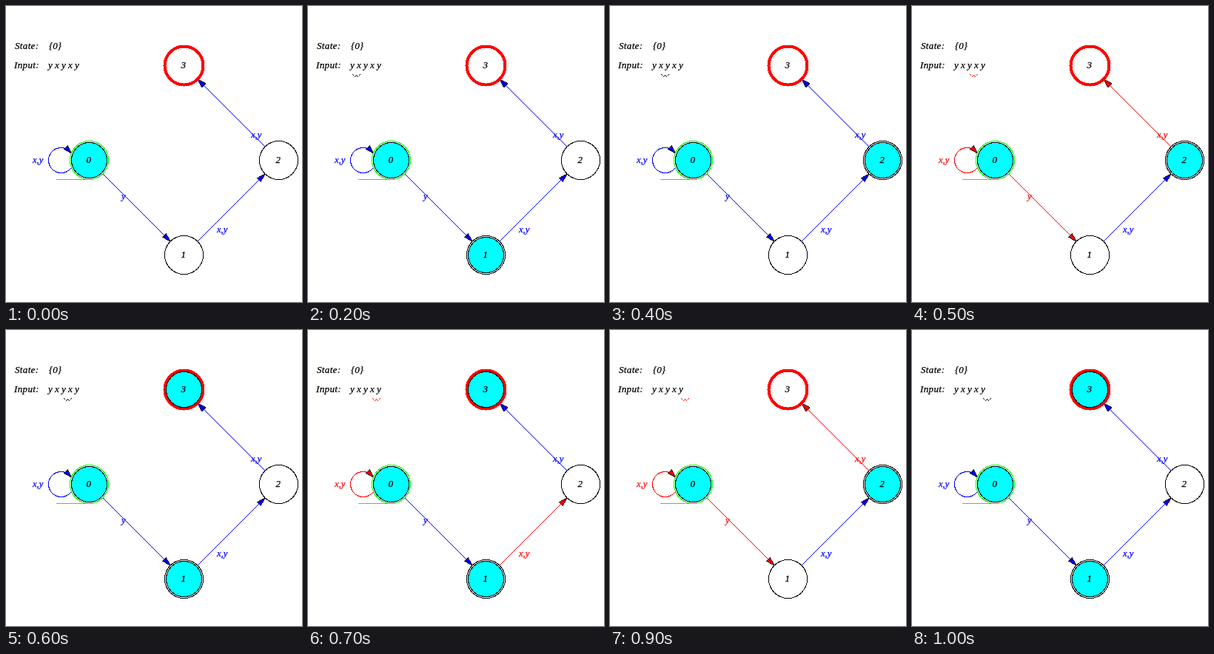
These frames come from a looping animation (400 by 400 pixels, 1.1 s). An HTML page:

```html
<!DOCTYPE html>
<html lang="en">
<head>
<meta charset="utf-8">
<title>Automaton run</title>
<style>
  html, body { margin: 0; width: 100%; height: 100%; overflow: hidden; background: #fff; }
  svg { display: block; width: 400px; height: 400px; }
  text {
    font: italic 13px "Liberation Serif", "Times New Roman", serif;
    fill: currentColor; stroke: currentColor; stroke-width: .25;
  }
  .head { letter-spacing: .35px; }
  .line { fill: none; stroke: #000; shape-rendering: crispEdges; }
  .start { stroke: #0f0; }
  .final { stroke: #f00; stroke-width: 4; }
  .active { fill: #0ff; stroke: #000; shape-rendering: crispEdges; }

  .edge { color: #00f; }
  .edge .line, .caret .line { stroke: currentColor; }
  .edge text { font-size: 12.5px; }
  .tip { fill: currentColor; stroke: #000; stroke-width: .9; shape-rendering: crispEdges; }

  /* Eleven steps of 100 ms: odd steps read a symbol, even steps settle. */
  .edge, .run, .caret { animation: 1100ms step-end infinite; }
  .loop { animation-name: any; }
  .e01 { animation-name: first; }
  .e12 { animation-name: second; }
  .e23 { animation-name: third; }
  .s1 { animation-name: on1; }
  .s2 { animation-name: on2; }
  .s3 { animation-name: on3; }
  .caret { animation-name: move, read; }

  @keyframes any {
    0%, 18.18%, 36.36%, 54.54%, 72.72%, 90.9% { color: #00f; }
    9.09%, 27.27%, 45.45%, 63.63%, 81.81% { color: #f00; }
  }
  @keyframes read {
    0%, 18.18%, 36.36%, 54.54%, 72.72%, 90.9% { color: #000; }
    9.09%, 27.27%, 45.45%, 63.63%, 81.81% { color: #f00; }
  }
  @keyframes first {
    0%, 18.18%, 54.54%, 90.9% { color: #00f; }
    9.09%, 45.45%, 81.81% { color: #f00; }
  }
  @keyframes second {
    0%, 36.36%, 72.72% { color: #00f; }
    27.27%, 63.63% { color: #f00; }
  }
  @keyframes third {
    0%, 54.54%, 90.9% { color: #00f; }
    45.45%, 81.81% { color: #f00; }
  }
  @keyframes on1 {
    0%, 36.36%, 72.72% { visibility: hidden; }
    18.18%, 54.54%, 90.9% { visibility: visible; }
  }
  @keyframes on2 {
    0%, 54.54%, 90.9% { visibility: hidden; }
    36.36%, 72.72% { visibility: visible; }
  }
  @keyframes on3 {
    0%, 72.72% { visibility: hidden; }
    54.54%, 90.9% { visibility: visible; }
  }
  @keyframes move {
    0% { visibility: hidden; transform: translate(65px, 92px); }
    9.09% { visibility: visible; transform: translate(65px, 92px); }
    27.27% { visibility: visible; transform: translate(74px, 92px); }
    45.45% { visibility: visible; transform: translate(83px, 92px); }
    63.63% { visibility: visible; transform: translate(92px, 92px); }
    81.81%, 100% { visibility: visible; transform: translate(101px, 92px); }
  }
</style>
</head>
<body>
<svg viewBox="0 0 400 400">
  <defs>
    <path id="tip" d="M0 0L-11.5 -3.5V3.5Z"/>
    <circle id="ring" r="26"/>
    <circle id="disc" r="24"/>
  </defs>

  <text class="head" x="12" y="58">State:</text>
  <text x="58" y="58">{0}</text>
  <text class="head" x="11" y="84">Input:</text>
  <text x="57" y="84">y x y x y</text>
  <g class="caret"><path class="line" d="M-4.5 .5l2 2M-2.5 4.5L.5 1.5L3.5 4.5M3.5 2.5l2 -2"/></g>

  <g class="edge loop">
    <circle class="line" cx="74.5" cy="208.5" r="17"/>
    <use href="#tip" class="tip" transform="translate(89 199.5) rotate(46)"/>
    <text x="36" y="212">x,y</text>
  </g>
  <g class="edge e01">
    <path class="line" d="M131 227L222 318"/>
    <use href="#tip" class="tip" transform="translate(222 318) rotate(45)"/>
    <text x="156" y="261">y</text>
  </g>
  <g class="edge e12">
    <path class="line" d="M259 318L350 227"/>
    <use href="#tip" class="tip" transform="translate(350 227) rotate(-45)"/>
    <text x="285" y="306">x,y</text>
  </g>
  <g class="edge e23">
    <path class="line" d="M350 190L259 99"/>
    <use href="#tip" class="tip" transform="translate(259.5 99.5) rotate(-135)"/>
    <text x="331" y="178">x,y</text>
  </g>

  <g transform="translate(112.5 208.5)">
    <path class="line start" d="M-45 26H1"/>
    <use href="#ring" class="line start"/>
    <use href="#disc" class="active"/>
    <text x="-4" y="3.5">0</text>
  </g>
  <g transform="translate(240.5 336.5)">
    <use href="#ring" class="line"/>
    <use href="#disc" class="active run s1"/>
    <text x="-4" y="3.5">1</text>
  </g>
  <g transform="translate(368.5 208.5)">
    <use href="#ring" class="line"/>
    <use href="#disc" class="active run s2"/>
    <text x="-4" y="3.5">2</text>
  </g>
  <g transform="translate(240.5 80.5)">
    <use href="#ring" class="line final"/>
    <use href="#disc" class="active run s3"/>
    <text x="-4" y="3.5">3</text>
  </g>
</svg>
</body>
</html>
```
